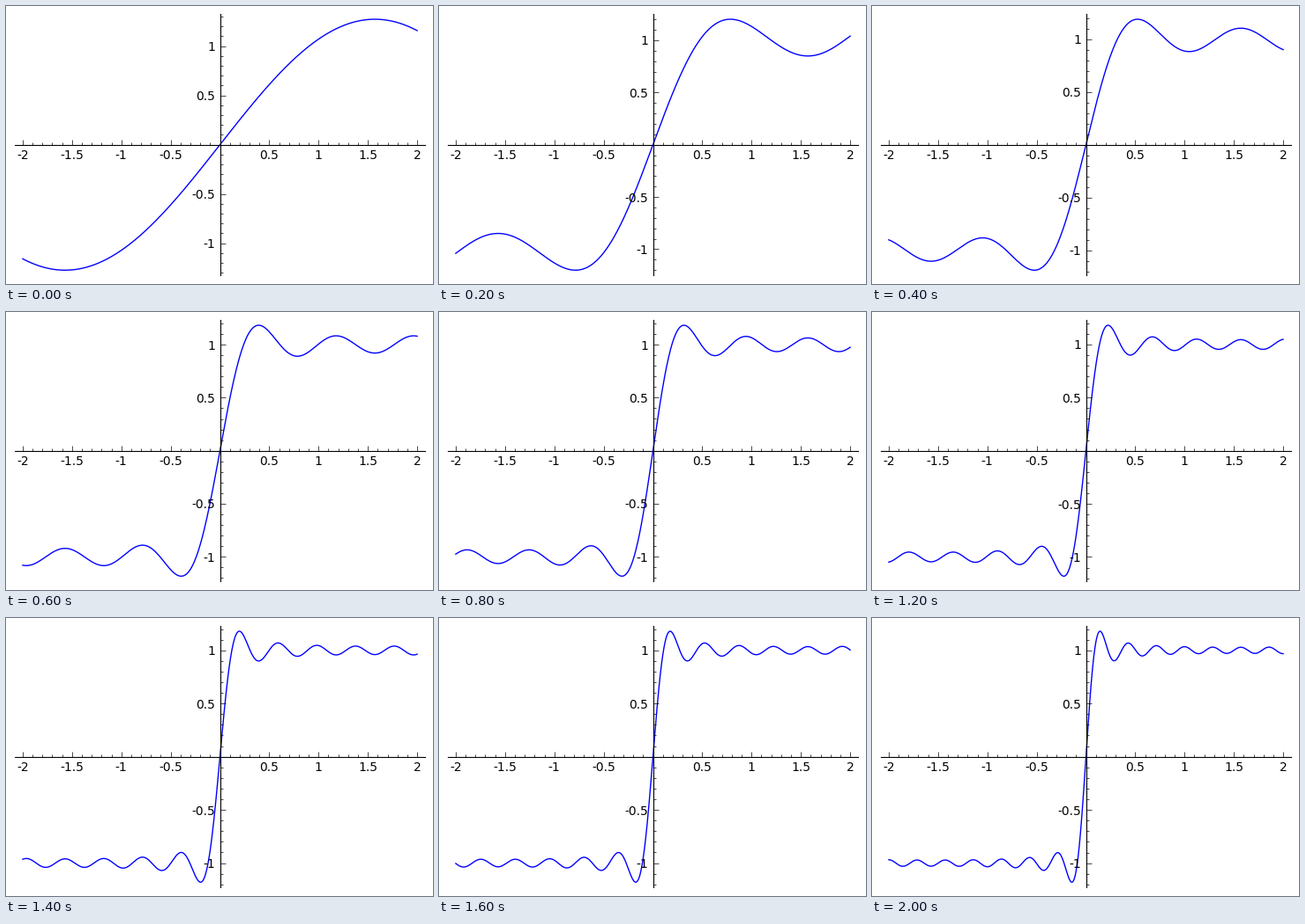
A matplotlib script that plays this animation: 484x316 px, repeating every 2200 ms.

```python
import numpy as np
import matplotlib.pyplot as plt
from matplotlib.animation import FuncAnimation
from matplotlib.ticker import FixedLocator, FuncFormatter

W, H, DPI = 484, 316, 100
LEFT, BOTTOM, AX_W, AX_H = 10.01, 10, 465, 296.66
FRAMES, INTERVAL = 11, 200
MARGIN = 1.04

plt.rcParams.update({"font.family": "DejaVu Sans", "font.size": 10})

x = np.linspace(-2, 2, 601)


def square_wave(terms):
    """Partial Fourier sum of a unit square wave."""
    odd = 2 * np.arange(terms)[:, None] + 1
    return 4 / np.pi * (np.sin(odd * x) / odd).sum(axis=0)


def style_axis(axis, limit):
    majors = [k / 2 for k in range(-2 * limit, 2 * limit + 1) if k]
    minors = [k / 10 for k in range(-20, 21) if k % 5]
    axis.set_major_locator(FixedLocator(majors))
    axis.set_minor_locator(FixedLocator(minors))
    axis.set_major_formatter(FuncFormatter(lambda v, _: f"{v:g}"))


fig = plt.figure(figsize=(W / DPI, H / DPI), dpi=DPI, facecolor="white")
ax = fig.add_axes([LEFT / W, BOTTOM / H, AX_W / W, AX_H / H])
ax.set_axisbelow(False)
ax.set_xlim(-2 * MARGIN, 2 * MARGIN)

for side in ("top", "right"):
    ax.spines[side].set_visible(False)
for side in ("left", "bottom"):
    ax.spines[side].set_position("zero")
    ax.spines[side].set_linewidth(0.8)

style_axis(ax.xaxis, 2)
style_axis(ax.yaxis, 1)
ax.tick_params(which="both", direction="in", width=0.5, pad=4)
ax.tick_params(which="major", length=4)
ax.tick_params(which="minor", length=2)

curve, = ax.plot(x, square_wave(1), color="#0000ff", lw=1)


def update(i):
    y = square_wave(i + 1)
    curve.set_ydata(y)
    top = MARGIN * y.max()
    ax.set_ylim(-top, top)
    return curve,


anim = FuncAnimation(fig, update, frames=FRAMES, interval=INTERVAL,
                     init_func=lambda: update(0), repeat=True, repeat_delay=0)
plt.show()
```
